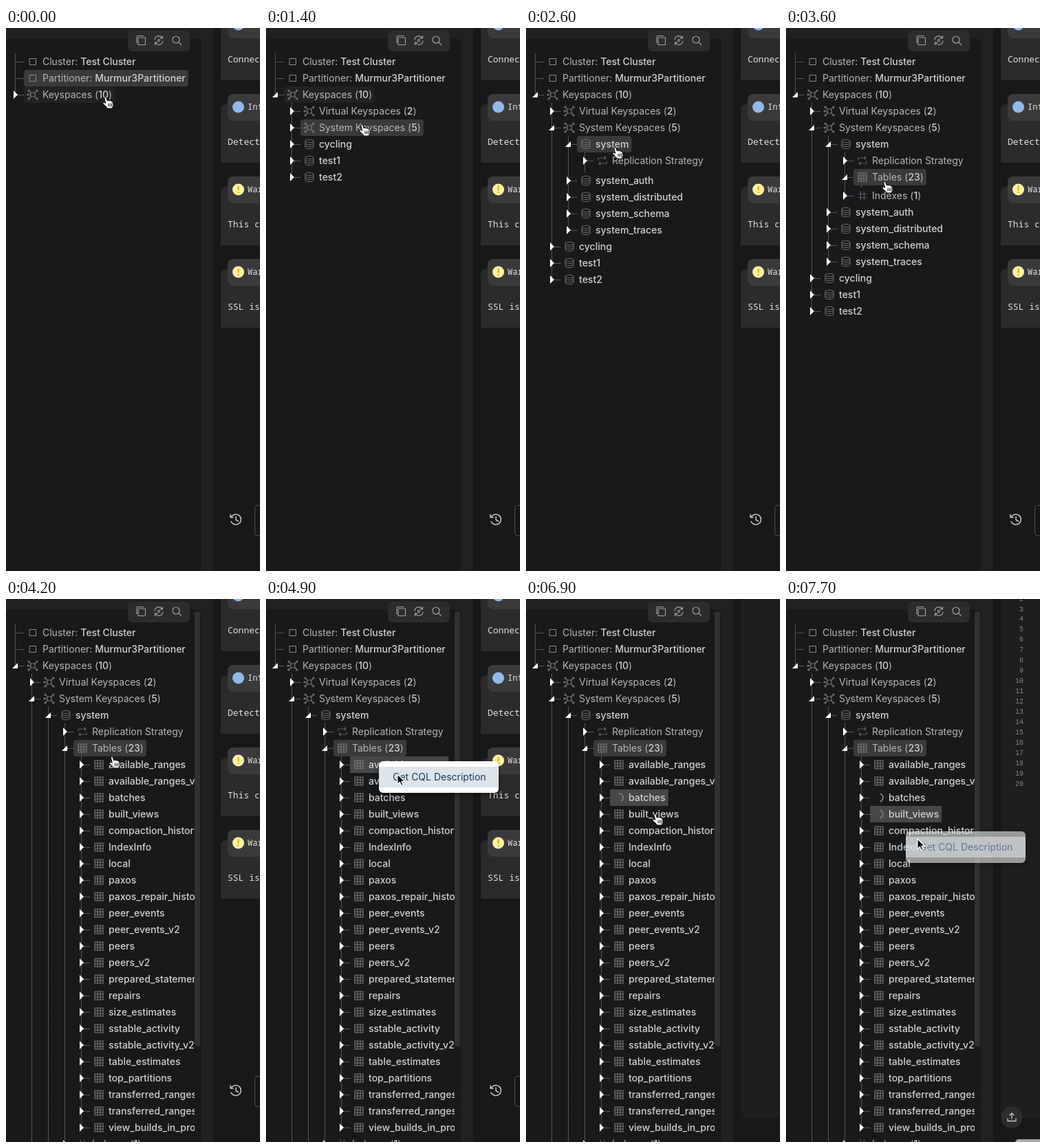
Write an HTML page with a canvas that moves like this. It is 369x790 px and loops after 8 s.

```html
<!DOCTYPE html>
<html lang="en">
<head>
<meta charset="utf-8">
<title>Keyspace tree</title>
<style>
html, body { margin: 0; width: 100%; height: 100%; overflow: hidden; background: #202123; }
canvas { display: block; }
</style>
</head>
<body>
<canvas id="stage" width="369" height="790"></canvas>
<script>
const LOOP = 8000, W = 369, H = 790, ROW = 24;
const c = document.getElementById('stage').getContext('2d');
const SANS = 'Inter, sans-serif', MONO = '"Noto Sans Mono", monospace';
const clamp = v => Math.max(0, Math.min(1, v));

// --- tree data -----------------------------------------------------------
const node = (icon, label, value, kids = [], openAt = Infinity, tail = '') =>
  ({ icon, label, value, kids, openAt, tail });
const group = (icon, name, count, kids, openAt) =>
  node(icon, name + ' (', String(count), kids, openAt, ')');
const db = (name, kids, openAt) => node('db', '', name, kids, openAt);

const tableNames = `available_ranges available_ranges_v2 batches built_views compaction_history
  IndexInfo local paxos paxos_repair_history peer_events peer_events_v2 peers peers_v2
  prepared_statements repairs size_estimates sstable_activity sstable_activity_v2 table_estimates
  top_partitions transferred_ranges transferred_ranges_v2 view_builds_in_progress`.split(/\s+/);

const system = db('system', [
  node('repeat', 'Replication Strategy', ''),
  group('grid', 'Tables', 23, tableNames.map(n => node('grid', '', n)), 3590),
  group('hash', 'Indexes', 1)
], 2513);
const tree = [
  node('square', 'Cluster: ', 'Test Cluster'),
  node('square', 'Partitioner: ', 'Murmur3Partitioner'),
  group('net', 'Keyspaces', 10, [
    group('net', 'Virtual Keyspaces', 2),
    group('net', 'System Keyspaces', 5, [
      system, ...['auth', 'distributed', 'schema', 'traces'].map(n => db('system_' + n))
    ], 1510),
    db('cycling'), db('test1'), db('test2')
  ], 410)
];

// --- timeline ------------------------------------------------------------
// label, from, to, alpha
const hovers = [
  ['Partitioner: ', 0, 300, 1], ['Partitioner: ', 300, 400, .3],
  ['Keyspaces (', 0, 300, .3], ['Keyspaces (', 300, 1400, 1], ['Keyspaces (', 1400, 1500, .3],
  ['System Keyspaces (', 1400, 2400, 1], ['System Keyspaces (', 2400, 2500, .3],
  ['system', 2400, 3500, 1], ['system', 3500, 3600, .3],
  ['Tables (', 3500, LOOP, 1],
  ['available_ranges', 4600, 5700, 1.4], ['available_ranges_v2', 5800, 6500, 1.4],
  ['batches', 6600, 7200, 1.4], ['built_views', 7300, LOOP, 1.4]
];
const loading = {
  available_ranges: [5500, 6500], available_ranges_v2: [6100, 6850],
  batches: [6900, LOOP], built_views: [7500, LOOP]
};
// show, hide, x, y
const menus = [
  [4600, 5400, 164, 236], [5700, 6000, 168, 256], [6400, 6700, 165, 291],
  [7100, 7500, 168, 313], [7588, LOOP, 174, 338]
];
// start, end, x, y
const moves = [
  [0, 0, 145, 100], [600, 800, 140, 127], [900, 1000, 140, 138], [1100, 1200, 140, 140],
  [1700, 2000, 130, 173], [2700, 3000, 143, 230], [3100, 3200, 143, 233], [3200, 3300, 144, 223],
  [4000, 4400, 165, 235], [4700, 4900, 191, 255], [5400, 5700, 169, 257], [5800, 6000, 175, 274],
  [6000, 6200, 182, 290], [6500, 6600, 176, 304], [6800, 6900, 188, 312],
  [7200, 7300, 186, 334], [7600, 7700, 191, 349]
];
const isArrow = t => t >= 4800 && t < 5400 || t >= 7300;

// the screen refreshes ten times a second, and only now and then near the end
const tick = ms => ms < 6200 ? Math.floor(ms / 100) * 100
  : [7700, 7300, 6900, 6600, 6200].find(s => ms >= s);

// --- drawing helpers -----------------------------------------------------
function box(x, y, w, h, r, fill, stroke) {
  c.beginPath();
  c.roundRect(x, y, w, h, r);
  if (fill) { c.fillStyle = fill; c.fill(); }
  if (stroke) { c.strokeStyle = stroke; c.lineWidth = 1; c.stroke(); }
}
function disc(x, y, r, fill) {
  c.beginPath();
  c.arc(x, y, r, 0, 7);
  c.fillStyle = fill;
  c.fill();
}
function print(s, x, y, fill, font) {
  c.font = font;
  c.fillStyle = fill;
  c.fillText(s, x, y);
  return c.measureText(s).width;
}
function path(d, x, y, stroke, width = 1, fill) {
  const p = new Path2D(d);
  c.save();
  c.translate(x, y);
  if (fill) { c.fillStyle = fill; c.fill(p); }
  if (stroke) {
    c.strokeStyle = stroke;
    c.lineWidth = width;
    c.lineJoin = c.lineCap = 'round';
    c.stroke(p);
  }
  c.restore();
}
function dots(x1, y1, x2, y2) {
  c.setLineDash([1, 1]);
  c.strokeStyle = '#8e8e8e';
  c.lineWidth = 1;
  c.beginPath();
  c.moveTo(x1, y1);
  c.lineTo(x2, y2);
  c.stroke();
  c.setLineDash([]);
}

const icons = {
  square: ['M-4.5-4.5h9v9h-9z', '#8a8b8d'],
  net: ['M-3-3h6v6h-6zM-3-3L-5-5M3-3L5-5M3 3L5 5M-3 3L-5 5M-3 0H-6' +
    'M-7-6a1 1 0 1 0 2 0a1 1 0 1 0-2 0M5-6a1 1 0 1 0 2 0a1 1 0 1 0-2 0' +
    'M5 6a1 1 0 1 0 2 0a1 1 0 1 0-2 0M-7 6a1 1 0 1 0 2 0a1 1 0 1 0-2 0M-8 0a1 1 0 1 0 2 0a1 1 0 1 0-2 0', '#77787a', 1.2],
  db: ['M-6-4.5a6 2.2 0 1 0 12 0a6 2.2 0 1 0-12 0V4.5a6 2.2 0 0 0 12 0V-4.5' +
    'M-6-1.5a6 2.2 0 0 0 12 0M-6 1.5a6 2.2 0 0 0 12 0', '#6e6f71'],
  grid: ['M-6-6H6V6H-6zM-2-6V6M2-6V6M-6-2H6M-6 2H6', '#77787a', 1.2],
  repeat: ['M-6-1V-4H5M3-6L5-4L3-2M6 1V4H-5M-3 2L-5 4L-3 6', '#5c5d5f', 1.2],
  hash: ['M-2.5-6V6M2.5-6V6M-6-2.5H6M-6 2.5H6', '#5c5d5f', 1.2]
};

// --- tree ----------------------------------------------------------------
const openness = (n, t) => .5 - Math.cos(Math.PI * clamp((t - n.openAt) / 200)) / 2;
const heightOf = (nodes, t) => nodes.reduce((sum, n) => sum + ROW + kidsHeight(n, t), 0);
const kidsHeight = (n, t) => t > n.openAt ? Math.round(heightOf(n.kids, t) * openness(n, t)) : 0;

function drawRow(n, x, y, t) {
  const key = n.label || n.value, textX = x + 40;
  const light = `500 14px ${SANS}`, plain = `400 14px ${SANS}`;
  c.font = plain;
  let width = c.measureText(n.label + n.tail).width;
  c.font = light;
  width += c.measureText(n.value).width;
  for (const [label, from, to, alpha] of hovers) {
    if (label !== key || t < from || t >= to) continue;
    c.globalAlpha = Math.min(1, alpha);
    box(x + 13, y - 12, width + 31, ROW, alpha > 1 ? 0 : 4, alpha > 1 ? '#464748' : '#393a3b');
    c.globalAlpha = 1;
  }
  dots(x, y + .5, x + 13, y + .5);
  if (n.icon !== 'square') {
    path(t > n.openAt ? 'M-4 4L4-4V4z' : 'M-2-6L4 0L-2 6z', x, y, null, 0, '#fff');
  }
  const busy = loading[key];
  if (busy && t >= busy[0] && t < busy[1]) {
    const a = (t - 7700) / 755 * 2 * Math.PI;
    c.beginPath();
    c.arc(x + 26, y, 6, a - 1.3, a + 1.3);
    c.strokeStyle = '#77787a';
    c.lineWidth = 2;
    c.stroke();
  } else {
    const [d, colour, weight] = icons[n.icon];
    path(d, x + 26, y, colour, weight);
  }
  let end = textX + print(n.label, textX, y + 5, '#b4b5b7', plain);
  end += print(n.value, end, y + 5, '#cfd0d2', light);
  print(n.tail, end, y + 5, '#b4b5b7', plain);
}

function drawTree(nodes, level, y, t) {
  const x = 13 + level * ROW, top = y - 12;
  let last = y;
  const ys = nodes.map(n => {
    last = y;
    y += ROW + kidsHeight(n, t);
    return last;
  });
  dots(x + .5, top, x + .5, last);
  nodes.forEach((n, i) => {
    const h = kidsHeight(n, t);
    drawRow(n, x, ys[i], t);
    if (!h) return;
    c.save();
    c.beginPath();
    c.rect(0, ys[i] + 12, W, h);
    c.clip();
    drawTree(n.kids, level + 1, ys[i] + ROW, t);
    c.restore();
  });
}

function drawLeft(t) {
  box(.5, 16.5, 282, 800, 4, '#18191b', '#141517');
  const content = heightOf(tree, t) + 19, scrolls = content > 777;
  c.save();
  c.beginPath();
  c.rect(0, 18, scrolls ? 274 : 283, H);
  c.clip();
  drawTree(tree, 0, 49, t);
  c.restore();
  if (scrolls) box(274, 18, 8, 604500 / content, 4, '#303133');

  box(177, 4, 90, 30, 6, '#2b2c2d');
  const ink = '#a2a3a4';
  path('M-3-4H5.5Q6.5-4 6.5-3V5.500Q6.5 6.500 5.500 6.500H-3Q-4 6.500-4 5.500V-3Q-4-4-3-4M-6 4V-5Q-6-6.500-4.500-6.500H4', 196, 18, ink, 1.1);
  path('M-6-1A6 6 0 0 1 5-3.500M5.500-6.500V-3.200H2M6 1A6 6 0 0 1-5 3.500M-5.500 6.500V3.200H-2M-1.500 0a1.500 1.500 0 1 0 3 0a1.500 1.500 0 1 0-3 0', 222, 18, ink, 1.2);
  path('M-6-1a5 5 0 1 0 10 0a5 5 0 1 0-10 0M2.700 2.700L6.500 6.500', 248, 18, ink, 1.2);
}

// --- right side ----------------------------------------------------------
function drawCard(y, title, text, warning) {
  box(312, y - 4, 80, 85, 8, '#2b2b2b');
  c.fillStyle = '#2b2b2b';
  c.fillRect(312, y + 60, 60, 21);
  box(322, y - 19, 80, 39, 8, '#3a3a3b');
  disc(337.5, y, 8.5, warning ? '#fdf2a6' : '#92b8e8');
  if (warning) {
    box(336.5, y - 5.5, 2.2, 7, 1, '#e3b505');
    disc(337.6, y + 4, 1.3, '#e3b505');
  }
  print(title, 351, y + 4, '#e4e4e4', `500 12px ${MONO}`);
  print(text, 322, y + 55, '#dedede', `400 13px ${MONO}`);
}

function drawRight(t) {
  c.fillStyle = '#17181a';
  c.fillRect(301, 0, 68, H);
  if (t < 6900) {
    drawCard(-5, 'Info', 'Connected');
    drawCard(115, 'Info', 'Detected');
    drawCard(235, 'Warning', 'This connection', true);
    drawCard(355, 'Warning', 'SSL is not', true);
    path('M-7-3A7.500 7.500 0 1 1-7 3M-8-7V-3H-4M0-4V0.500L3.500 2.500', 334, 715, '#c4c5c6', 1.5);
    box(361.5, 694.5, 40, 44, 4, '#151618', '#505153');
    return;
  }
  c.fillStyle = '#1e1e1e';
  c.fillRect(312, 0, 57, 755);
  if (t < 7300) return;
  c.textAlign = 'right';
  for (let n = 2; n <= 20; n++) {
    print(n, 345, 17.5 + (n - 3) * 14.95, '#858585', '10px "Liberation Mono", monospace');
  }
  c.textAlign = 'left';
  disc(328, 754, 15.5, '#2c2d2f');
  path('M0 2V-6M-3-3L0-6L3-3M-6 2V5.500H6V2', 328, 754, '#c4c5c6', 1.3);
  if (t >= 7700) box(333, 786, 60, 30, 5, '#a9a9a9');
}

// --- overlays ------------------------------------------------------------
function drawMenu([show, hide, x, y], t) {
  const alpha = Math.min(clamp((t - show) / 200), 1 - clamp((t - hide) / 200));
  if (!alpha) return;
  c.save();
  c.globalAlpha = alpha;
  c.shadowColor = 'rgba(0,0,0,.35)';
  c.shadowBlur = 10;
  c.shadowOffsetY = 3;
  box(x, y, 174, 46, 6, '#fff');
  c.shadowColor = 'transparent';
  c.fillStyle = '#dde4ea';
  c.fillRect(x, y + 8, 174, 30);
  print('Get CQL Description', x + 20, y + 28, '#1c3a61', `400 14px ${SANS}`);
  c.restore();
}

function drawCursor(t) {
  let x = 0, y = 0;
  for (const [start, end, toX, toY] of moves) {
    if (t < start) break;
    const p = end > start ? clamp((t - start) / (end - start)) : 1;
    x += (toX - x) * p;
    y += (toY - y) * p;
  }
  if (isArrow(t)) {
    path('M0 0V14.500L3.400 11.300 5.600 16.500 8 15.500 5.900 10.400 10.500 10.200Z', x, y, '#fff', 1.2, '#000');
  } else {
    path('M-2 1.500Q-1.500-.5 .3 .6L2.300 6Q4 4.600 5 6Q6.800 5 7.600 6.600Q9.600 6 10 8L11 12Q11 14 9.600 15.500' +
      'L9.400 17H2L1.500 15.500L-4 10.200Q-5 8-2.600 8.200L-.6 9.300ZM4 10V14M6.300 10V14M8.500 10V14', x, y, '#111', 1, '#fff');
  }
}

function frame(now) {
  const t = tick(now % LOOP);
  c.fillStyle = '#202123';
  c.fillRect(0, 0, W, H);
  drawLeft(t);
  drawRight(t);
  menus.forEach(m => drawMenu(m, t));
  drawCursor(t);
  requestAnimationFrame(frame);
}
requestAnimationFrame(frame);
</script>
</body>
</html>
```
